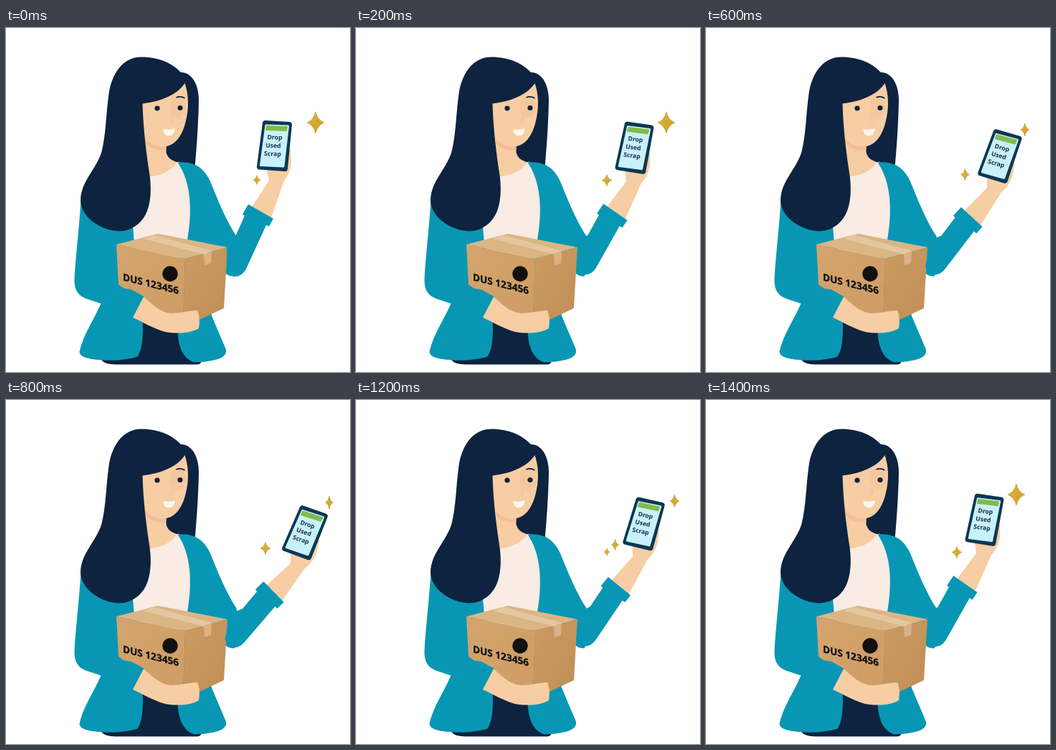
These frames come from a looping animation (480 by 480 pixels, 1.6 s). An HTML page:

```html
<!DOCTYPE html>
<html lang="en">
<head>
<meta charset="utf-8">
<title>Parcel and phone</title>
<style>
  html, body { margin: 0; width: 100%; height: 100%; overflow: hidden; background: #fff; }
  svg { display: block; width: 100%; height: 100%; }
  text { font-family: "Noto Sans", "Open Sans", sans-serif; font-weight: 700; }
  .navy { fill: #0d233f; }
  .teal { fill: #0797b4; }
  .skin { fill: #f7cda3; }
  .screen { font-size: 8.6px; text-anchor: middle; fill: #14304c; }
</style>
</head>
<body>
<svg viewBox="0 0 480 480">
  <defs>
    <linearGradient id="front" x2="1" y2="1">
      <stop stop-color="#d3a46e"/><stop offset="1" stop-color="#cf9d64"/>
    </linearGradient>
    <linearGradient id="side" x2="1" y2="1">
      <stop stop-color="#cb9b62"/><stop offset="1" stop-color="#c08e56"/>
    </linearGradient>
    <linearGradient id="gold" x2="1" y2="1">
      <stop offset=".4" stop-color="#dcb23c"/><stop offset=".7" stop-color="#c99a25"/>
    </linearGradient>
  </defs>

  <g transform="translate(.5 .5)">
    <!-- hair behind the face -->
    <path class="navy" d="M236 62C256 57 268 74 268.500 100C268 130 266 160 263 194L220 190V70Z"/>

    <!-- neck and shirt -->
    <path class="skin" d="M192 150H223V173C225 181 231 185 240 187L232 207L198 212Z"/>
    <path fill="#f5bd97" d="M194 152L223 160V169C211 172 200 167 195 161Z"/>
    <path fill="#f8ece4" d="M198 207C213 206 230 200 238 187L241 186C262 210 264 255 252 300H176V265Z"/>

    <!-- trousers and jacket -->
    <path class="navy" d="M188 380H241C241 430 246 458 272 465Q271 469 266 469H152Q137 469 132 462L182 456Z"/>
    <path class="teal" d="M239 187C264 185 279 196 288 222C298 247 309 272 321 290L328 325L318 346Q307 346 303 338L286 400L306 447C310 459 294 465 262 466C245 460 240 442 239 423V330L252 298C260 255 258 215 239 187Z"/>
    <path class="teal" d="M104 240C101 285 96 325 95 352C95 366 101 373 111 377L132 384C122 407 107 428 102 451C102 460 119 462 135 463C152 464 172 462 183 458C191 446 191 425 190 400L200 360L178 295L176 270Z"/>

    <!-- face -->
    <path class="skin" d="M188 98L248 74C255 91 255 113 250 131C245 151 235 164 220 165C208 166 197 160 192 150Z"/>
    <ellipse cx="239" cy="110" rx="11" ry="15" fill="#efb68a" opacity=".25"/>
    <g class="navy"><circle cx="210.500" cy="111.500" r="3.6"/><circle cx="242.500" cy="111" r="3.6"/></g>
    <path d="M237 96.500Q243 94 249 97.500" fill="none" stroke="#0d233f" stroke-width="1.7"/>
    <path d="M231 122L232 130Q230 132 227 131" fill="none" stroke="#f0bd94" stroke-width="1"/>
    <path fill="#fff5ee" d="M219 140.500Q228 142.500 235 139.500C235 147 231 150 226 150C221 149 219 146 219 140.500Z"/>

    <!-- fringe and long hair -->
    <path class="navy" d="M250 75C240 92 216 102 190 105C191 140 195 172 200 205C204 235 199 258 187 270C178 279 168 283 157 283C131 282 104 263 103.500 240C104 213 126 196 133 172C139 148 139 120 143 91C147 64 162 40 188 40C215 40 233 50 244 62Z"/>
  </g>

  <!-- parcel -->
  <path fill="#dcb585" d="M154 302L212 287L309 306L250 322Z"/>
  <path fill="url(#front)" d="M154 302L250 322L247 412L200 388L157 358Z"/>
  <path fill="url(#side)" d="M250 322L309 306L304 391L268 408L247 412Z"/>
  <path fill="#e4c7a1" d="M192 294L206 289L288 311L276 316Z"/>
  <path fill="#d9b385" d="M276 316L287 312L286 328L277 331Z"/>
  <circle cx="229" cy="343" r="10.700" fill="#111"/>
  <text transform="matrix(1 .25 0 1 163 352)" font-size="13.6" fill="#111" stroke="#111" stroke-width=".3">DUS 123456</text>

  <!-- holding hand -->
  <path class="teal" d="M155 362L175 365L193 375L177 405L150 394Z"/>
  <path class="skin" d="M192 375C204 386 216 397 230 398C245 398 257 394 267 394C271 404 270 413 269 419C259 426 238 427 222 424C204 419 191 410 177 404Z"/>

  <!-- swinging forearm with phone -->
  <g id="arm">
    <path class="skin" d="M342 252L367 212L364 199L391 173L397 169L398 186C397 199 393 207 388 213L369 268Z"/>
    <path class="teal" d="M320 291L333 262L330 260L338 246L373 266L367 277L363 275L336 334C332 343 326 347 318 347L308 338V300Z"/>
    <path fill="#0b3853" stroke="#0b3853" stroke-width="8" stroke-linejoin="round" d="M362 133L395 135L389 196L354 193.500Z"/>
    <path fill="#c8f1fa" stroke="#c8f1fa" stroke-width="3" stroke-linejoin="round" d="M363 136L393.500 137L387 193L355.500 191.500Z"/>
    <path fill="#83bb4b" stroke="#83bb4b" stroke-width="2" stroke-linejoin="round" d="M364 137L392 138L391 143L363 142Z"/>
    <g class="screen">
      <text x="375" y="155.500" transform="rotate(2 375 153)">Drop</text>
      <text x="373" y="167" transform="rotate(2 373 164)">Used</text>
      <text x="372" y="178.500" transform="rotate(2 372 175)">Scrap</text>
    </g>
  </g>
  <path id="stars" fill="url(#gold)" stroke="#c09529" stroke-width=".6"/>
</svg>
<script>
  const arm = document.getElementById("arm");
  const stars = document.getElementById("stars");

  // forearm angle and lift, then sparkles as [x, y, half width, half height]
  const poses = [
    [0, 0, [432, 132, 12, 15], [350, 212, 5, 6.5]],
    [4.8, 2.6, [433, 132, 12, 15], [350, 212.500, 7, 8]],
    [9.6, 3.5, [444.500, 141, 6.5, 9], [361.500, 202, 5, 8], [350, 212, 4, 5]],
    [13, 2.6, [445, 142, 6, 9], [361.500, 204.500, 6, 8]],
    [16, 1.4, [451, 143, 5.5, 9], [362, 207, 7, 8.500]]
  ];

  function star([x, y, w, h]) {
    const a = w * 0.24, b = h * 0.22;
    return `M${x} ${y - h}Q${x + a} ${y - b} ${x + w} ${y}` +
      `Q${x + a} ${y + b} ${x} ${y + h}` +
      `Q${x - a} ${y + b} ${x - w} ${y}` +
      `Q${x - a} ${y - b} ${x} ${y - h}Z`;
  }

  function draw(now) {
    const step = Math.floor(now % 1600 / 200);
    const [angle, lift, ...sparkles] = poses[Math.min(step, 8 - step)];
    arm.setAttribute("transform", `translate(${lift * 0.3} ${-lift}) rotate(${angle} 318 325)`);
    stars.setAttribute("d", sparkles.map(star).join(""));
    requestAnimationFrame(draw);
  }
  draw(0);
</script>
</body>
</html>
```
